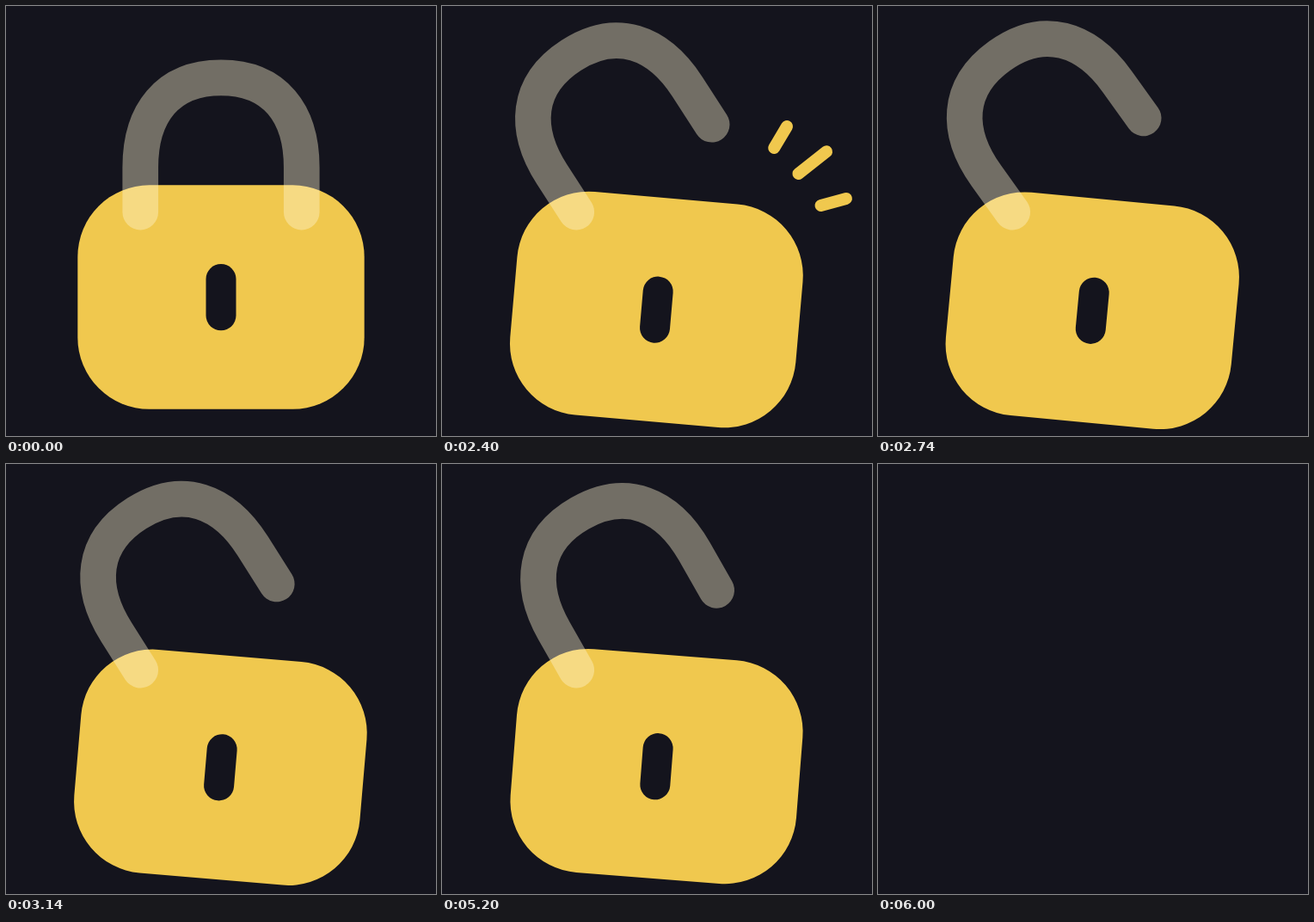
Animation of 500 by 500 pixels, one loop 6.02 s. Source, as an HTML page:

```html
<!DOCTYPE html>
<html lang="en">
<head>
<meta charset="utf-8">
<title>Padlock</title>
<style>
  html, body { margin: 0; height: 100%; overflow: hidden; background: #14141d; }
  svg { display: block; width: 100%; height: 100%; }
</style>
</head>
<body>
<svg viewBox="0 0 500 500">
  <g id="lock">
    <g id="body">
      <rect x="83.33" y="208.33" width="333.34" height="260.42" rx="83.33" fill="#f0c84e"/>
      <rect x="232.5" y="300" width="35" height="77.3" rx="17.5" fill="#14141d"/>
    </g>
    <path id="shackle" d="M156.25 239.58V187.5C156.25 125 187.5 83.33 250 83.33S343.75 125 343.75 187.5V239.58"
      fill="none" stroke="#fff6d3" stroke-opacity=".4" stroke-width="41.67" stroke-linecap="round"/>
    <g stroke="#f0c84e" stroke-width="14" stroke-linecap="round">
      <line class="ray"/><line class="ray"/><line class="ray"/>
    </g>
  </g>
</svg>
<script>
const LOOP = 6020, OPEN = 2177, CLOSE = 5180, FADE = 5800;
const RAY_TIME = 450, RAY_STARTS = [2180, 5330];
// angle, inner radius, outer radius
const RAYS = [[-59.3, 100, 158], [-38.2, 90, 173], [-15.4, 102, 163]];

const [lock, body, shackle] = ['lock', 'body', 'shackle'].map(id => document.getElementById(id));
const rays = document.querySelectorAll('.ray');
rays.forEach((ray, i) => ray.setAttribute('transform', `translate(328 263) rotate(${RAYS[i][0]})`));

const clamp = x => Math.min(1, Math.max(0, x));
const elasticOut = x => 1 - 2 ** (-10 * x) * Math.cos(4 * Math.PI * x);

function openness(t) {
  if (t < OPEN) return 0;
  if (t < CLOSE) return elasticOut(clamp((t - OPEN) / 1800));
  return (1 - clamp((t - CLOSE) / 600)) ** 3;
}

function drawRays(t) {
  const start = RAY_STARTS.find(s => t > s && t < s + RAY_TIME);
  const p = start ? (t - start) / RAY_TIME : 0;
  rays.forEach((ray, i) => {
    const [, inner, outer] = RAYS[i];
    ray.setAttribute('visibility', start ? 'visible' : 'hidden');
    ray.setAttribute('x1', inner + (outer - inner) * p * p);
    ray.setAttribute('x2', outer - (outer - inner) * (1 - p) ** 2);
  });
}

function draw(now) {
  const t = now % LOOP, k = openness(t);
  body.setAttribute('transform', `rotate(${5 * k} 83.33 338.54)`);
  shackle.setAttribute('transform', `rotate(${-33 * k} 156.25 239.58)`);
  lock.setAttribute('opacity', 1 - clamp((t - FADE) / 200));
  drawRays(t);
  requestAnimationFrame(draw);
}
draw(performance.now());
</script>
</body>
</html>
```
